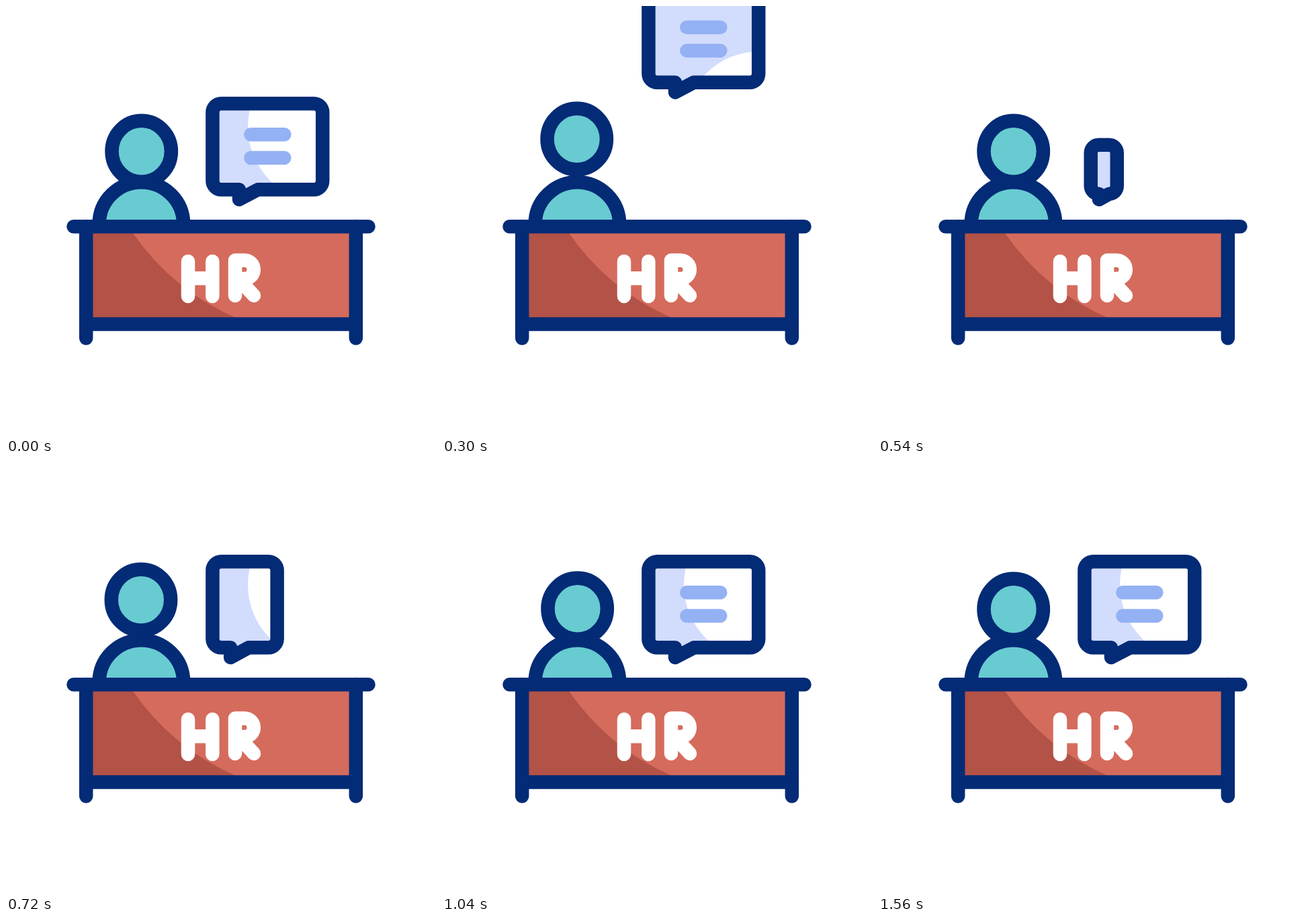
Write an HTML page with a canvas that moves like this. It is 640 px wide and 640 px high and loops after 1.62 s.

```html
<!DOCTYPE html>
<html lang="en">
<head>
<meta charset="utf-8">
<title>HR desk</title>
<style>
  html, body { margin: 0; height: 100%; overflow: hidden; background: #fff; }
  canvas { display: block; width: 100vw; height: 100vh; }
</style>
</head>
<body>
<canvas id="stage" width="640" height="640"></canvas>
<script>
const ctx = document.getElementById('stage').getContext('2d');
const LOOP = 1620, PEN = 20.5;
const NAVY = '#032b76', TEAL = '#68cbd1', RED = '#d56b5c', DARK_RED = '#b35247';
const LILAC = '#d2dcfd', BLUE = '#94b1f4', WHITE = '#fff';

const clamp = u => Math.min(1, Math.max(0, u));
const mix = (a, b, u) => a + (b - a) * u;
const ease = (t, from, to) => {
  const u = clamp((t - from) / (to - from));
  return u * u * (3 - 2 * u);
};

// cubic-bezier(.333, 0, .833, .833)
function easeIn(u) {
  let lo = 0, hi = 1;
  for (let i = 0; i < 20; i++) {
    const s = (lo + hi) / 2, r = 1 - s;
    if (r * r * s + 2.5 * r * s * s + s ** 3 < u) lo = s; else hi = s;
  }
  return 2.5 * (1 - lo) * lo * lo + lo ** 3;
}

function draw(path, stroke, fill) {
  const shape = typeof path === 'string' ? new Path2D(path) : path;
  if (fill) { ctx.fillStyle = fill; ctx.fill(shape); }
  if (stroke) { ctx.strokeStyle = stroke; ctx.stroke(shape); }
}

function drawPerson(t) {
  const bob = [[0, 540], [540, 1080], [1080, 1560]].reduce((sum, [a, b]) => {
    const mid = (a + b) / 2;
    return sum + ease(t, a, mid) - ease(t, mid, b);
  }, 0);
  const head = new Path2D();
  head.ellipse(201.7 - bob, 216.3 - 19 * bob, 44.2, 45.5, 0, 0, 2 * Math.PI);
  draw(head, NAVY, TEAL);
  draw('M138.6 328V325A62.8 62.8 0 0 1 264.2 325V328', NAVY, TEAL);
}

function drawDesk() {
  draw('M119 328H521V473.5H119Z', null, RED);
  draw('M119 338H189A355 355 0 0 0 341 463.5V473H119Z', null, DARK_RED);
  draw('M119.2 328V494.5M520.8 328V494.5M119 473.5H521M100.5 328.2H539.5', NAVY);
  draw('M271 380V432M307.3 380V432M271 405.3H307.3', WHITE);
  draw('M341 431V378.5H355A13.8 13.8 0 0 1 355 406.1H341M346 406L369 431', WHITE);
}

// grow: from a dot to a narrow bubble; widen: to full width
function bubblePath(grow, widen) {
  const dot = { x: 329, y: 288 };
  const x = (narrow, wide) => mix(dot.x, mix(narrow, wide, widen), grow);
  const y = v => mix(dot.y, v, grow);
  const left = x(307.4, 307.4), right = x(376, 471.2), tip = x(329, 347), base = x(355.5, 375);
  const top = y(145.3), bottom = y(273.3);
  const r = 13 * Math.min(1, grow * 1.6);
  const p = new Path2D();
  p.moveTo(tip, bottom);
  p.arcTo(left, bottom, left, top, Math.min(r, tip - left));
  p.arcTo(left, top, right, top, r);
  p.arcTo(right, top, right, bottom, r);
  p.arcTo(right, bottom, base, bottom, Math.min(r, right - base));
  p.lineTo(base, bottom);
  p.lineTo(tip, dot.y);
  p.closePath();
  return p;
}

function drawBubble(t) {
  const leaving = t < 470;
  const lift = leaving ? -311 * easeIn(t / 483) : 0;
  const shape = leaving ? bubblePath(1, 1) : bubblePath(ease(t, 470, 600), ease(t, 600, 940));
  ctx.save();
  ctx.translate(0, lift);
  draw(shape, null, LILAC);

  // The light patch stays still while the bubble passes over it
  ctx.save();
  ctx.clip(shape);
  const light = new Path2D();
  light.arc(472.5, 180 - lift, 112.5, 0, 2 * Math.PI);
  light.rect(472, 67.5 - lift, 20, 225);
  draw(light, null, WHITE);
  ctx.restore();

  [[191.3, 760], [226, 820]].forEach(([y, start]) => {
    const length = leaving ? 1 : ease(t, start, start + 180);
    if (length) draw(`M364.3 ${y}H${364.3 + 50 * length}`, BLUE);
  });
  draw(shape, NAVY);
  ctx.restore();
}

function render(now) {
  const t = now % LOOP;
  ctx.fillStyle = WHITE;
  ctx.fillRect(0, 0, 640, 640);
  ctx.lineWidth = PEN;
  ctx.lineCap = ctx.lineJoin = 'round';
  drawPerson(t);
  drawDesk();
  drawBubble(t);
}

const start = performance.now();
(function tick() {
  render(performance.now() - start);
  requestAnimationFrame(tick);
})();
</script>
</body>
</html>
```
